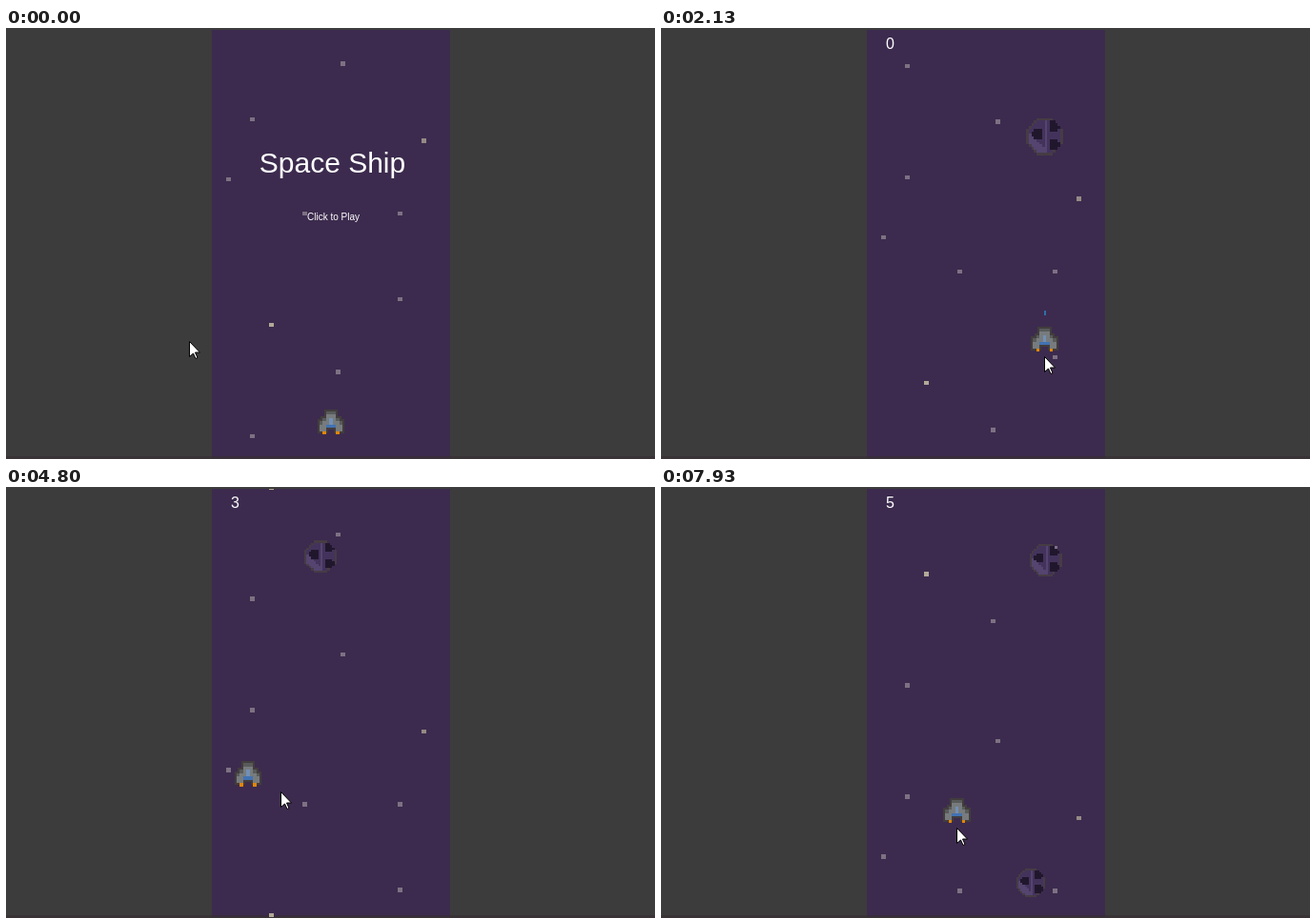
Animation, 681 px wide and 453 px high, one loop 8000 ms. Source, as an HTML page with a canvas:

```html
<!DOCTYPE html>
<html lang="en">
<head>
<meta charset="utf-8">
<title>Space Ship</title>
<style>
  html, body { margin: 0; width: 100%; height: 100%; overflow: hidden; background: #3c3c3c; }
  canvas { display: block; }
</style>
</head>
<body>
<canvas id="stage" width="681" height="453"></canvas>
<script>
const ctx = document.getElementById('stage').getContext('2d');
const LOOP = 8000, STEP = 1000 / 15;
const GAME_START = 1200;
const SHIP_LAG = 110;      // ms the ship trails the pointer
const FALL_SPEED = 0.258;  // px per ms
const BULLET_SPEED = 0.4;
const FIELD = { x: 216, y: 2, w: 250, h: 450 };

const linear = u => u;
const smooth = u => u * u * (3 - 2 * u);

// column and row on a 5 x 4.5 px grid
const STAR_COLOR = '#7d7183';
const stars = [
  [27, 0], [8, 13], [44, 18, '#958a85'], [3, 27], [19, 35],
  [39, 35], [39, 55], [12, 61, '#b2a998'], [26, 72], [8, 87]
];

// time and distance; the scroll starts a little slowly
const scrollKeys = [[0, 0], [930, 24.5], [2130, 61], [8000, 231.2]];

// time, x, y where the pointer turns
const pointerKeys = [
  [0, 193, 330], [600, 324, 205], [1200, 324, 205], [1900, 403, 346], [2130, 403, 346],
  [2800, 300, 338], [3800, 378, 333], [3950, 378, 333], [4550, 232, 320], [5000, 330, 322],
  [5535, 232, 314], [5843, 400, 307], [6100, 300, 304], [6370, 391, 300], [6790, 397, 302],
  [7210, 290, 316], [7800, 311, 359]
];

// passes: moment the centre is at y = 32; shot: moment the bullet leaves
const asteroids = [
  { x: 402.5, size: 39, passes: 1815, shot: 2130 },
  { x: 300, size: 32, passes: 2680, shot: 2910 },
  { x: 374, size: 29, passes: 3545, shot: 3990 },
  { x: 330, size: 34, passes: 4640, shot: 5110 },
  { x: 391.5, size: 34, passes: 5733, shot: 6470 },
  { x: 388, size: 30, passes: 6445, shot: Infinity },
  { x: 403.5, size: 34, passes: 7759, shot: Infinity }
];

const shipRows = [
  '..ddd..',
  '..ggg..',
  '.dglgd.',
  'dgglggd',
  'ggbbbgg',
  'gg...gg',
  '.f...f.'
];
const shipColors = { d: '#595b5b', g: '#777b7d', l: '#7290b6', b: '#4272b2', f: '#e08508' };

const arrow = new Path2D('M.5 .5V16.5L4.5 13L7 18.5L9 17.5L6.5 12H11.5Z');

function sample(keys, t, ease) {
  const next = keys.findIndex(k => k[0] > t);
  if (next < 0) return keys.at(-1).slice(1);
  const b = keys[next], a = keys[Math.max(0, next - 1)];
  const f = next ? ease((t - a[0]) / (b[0] - a[0])) : 0;
  return a.slice(1).map((v, k) => v + (b[k + 1] - v) * f);
}

const pointerAt = t => sample(pointerKeys, t, smooth);

function shipAt(t) {
  if (t < GAME_START) return [341, 415];
  const [x, y] = pointerAt(t - SHIP_LAG);
  return [Math.max(237, x - 0.5), y - 18];
}

const asteroidY = (a, t) => 32 + (t - a.passes) * FALL_SPEED;
const bulletY = (a, t) => shipAt(a.shot)[1] - 27 - (t - a.shot) * BULLET_SPEED;

for (const a of asteroids) {
  const gap = bulletY(a, a.shot) - asteroidY(a, a.shot) - a.size / 2;
  a.dead = a.shot < LOOP ? a.shot + gap / (FALL_SPEED + BULLET_SPEED) : Infinity;
}

// Edges snap to whole pixels so neighbouring cells meet without seams.
function rect(x, y, w, h, color) {
  const left = Math.round(x), top = Math.round(y);
  ctx.fillStyle = color;
  ctx.fillRect(left, top, Math.round(x + w) - left, Math.round(y + h) - top);
}

function drawCells(count, cx, cy, cell, colorAt, grow = 0) {
  const left = cx - count * cell / 2 - grow, top = cy - count * cell / 2 - grow;
  for (let row = 0; row < count; row++) {
    for (let col = 0; col < count; col++) {
      const color = colorAt(col, row);
      if (color) rect(left + col * cell, top + row * cell, cell + 2 * grow, cell + 2 * grow, color);
    }
  }
}

function rockColor(col, row) {
  const x = (col + 0.5) / 7 - 1, y = (row + 0.5) / 7 - 1;
  const near = (cx, cy, r) => Math.hypot(x - cx, y - cy) < r;
  if (!near(0, 0, 1)) return null;
  if (near(-0.37, -0.16, 0.3) || near(0.55, -0.6, 0.33) || near(0.55, 0.45, 0.32)) return '#21172d';
  if (!near(0, 0, 0.87)) return '#463c44';
  return y - x > 0.6 || Math.abs(x - 0.1) < 0.1 ? '#54446f' : '#43335c';
}

function text(str, x, y, size, align) {
  ctx.font = `${size}px "Liberation Sans", Arial, sans-serif`;
  ctx.textAlign = align;
  ctx.fillStyle = '#fff';
  ctx.fillText(str, x, y);
}

function drawStars(t) {
  const [scroll] = sample(scrollKeys, t, linear);
  for (const [col, row, color = STAR_COLOR] of stars) {
    const y = FIELD.y + (33.4 + row * 4.5 + scroll) % FIELD.h;
    for (const top of [y, y - FIELD.h]) rect(FIELD.x + col * 5, top, 5, 4.5, color);
  }
}

function drawAsteroids(t) {
  for (const a of asteroids.filter(a => t < a.dead)) {
    drawCells(14, a.x, asteroidY(a, t), a.size / 14, rockColor);
    if (t >= a.shot) rect(a.x - 0.5, bulletY(a, t) - 2.5, 2, 5, '#2f6ea8');
  }
}

function drawShip(t) {
  const [x, y] = shipAt(t);
  const colorAt = (col, row) => shipColors[shipRows[row][col]];
  drawCells(7, x, y, 3.45, (col, row) => row < 6 && colorAt(col, row) && '#423d3d', 2);
  drawCells(7, x, y, 3.45, colorAt);
}

function drawPointer(t) {
  const [x, y] = pointerAt(t).map(Math.round);
  ctx.save();
  ctx.translate(x - 1, y - 1);
  ctx.fillStyle = '#fff';
  ctx.fill(arrow);
  ctx.strokeStyle = '#000';
  ctx.stroke(arrow);
  ctx.restore();
}

function draw(t) {
  rect(0, 0, 681, 453, '#3c3c3c');
  rect(FIELD.x, FIELD.y, FIELD.w, FIELD.h, '#3c2b4e');
  rect(0, 450, 681, 3, 'rgba(56, 46, 50, 0.6)');

  ctx.save();
  ctx.beginPath();
  ctx.rect(FIELD.x, FIELD.y, FIELD.w, FIELD.h);
  ctx.clip();
  drawStars(t);
  drawAsteroids(t);
  drawShip(t);
  ctx.restore();

  if (t < GAME_START) {
    text('Space Ship', 342.5, 152, 30, 'center');
    text('Click to Play', 343.5, 202, 10, 'center');
  } else {
    text(asteroids.filter(a => t >= a.dead).length, 236, 22, 16, 'left');
  }
  drawPointer(t);
}

const start = performance.now();
function tick() {
  const t = (performance.now() - start) % LOOP;
  draw(Math.floor((t + 5) / STEP) * STEP % LOOP);
  requestAnimationFrame(tick);
}
tick();
</script>
</body>
</html>
```
